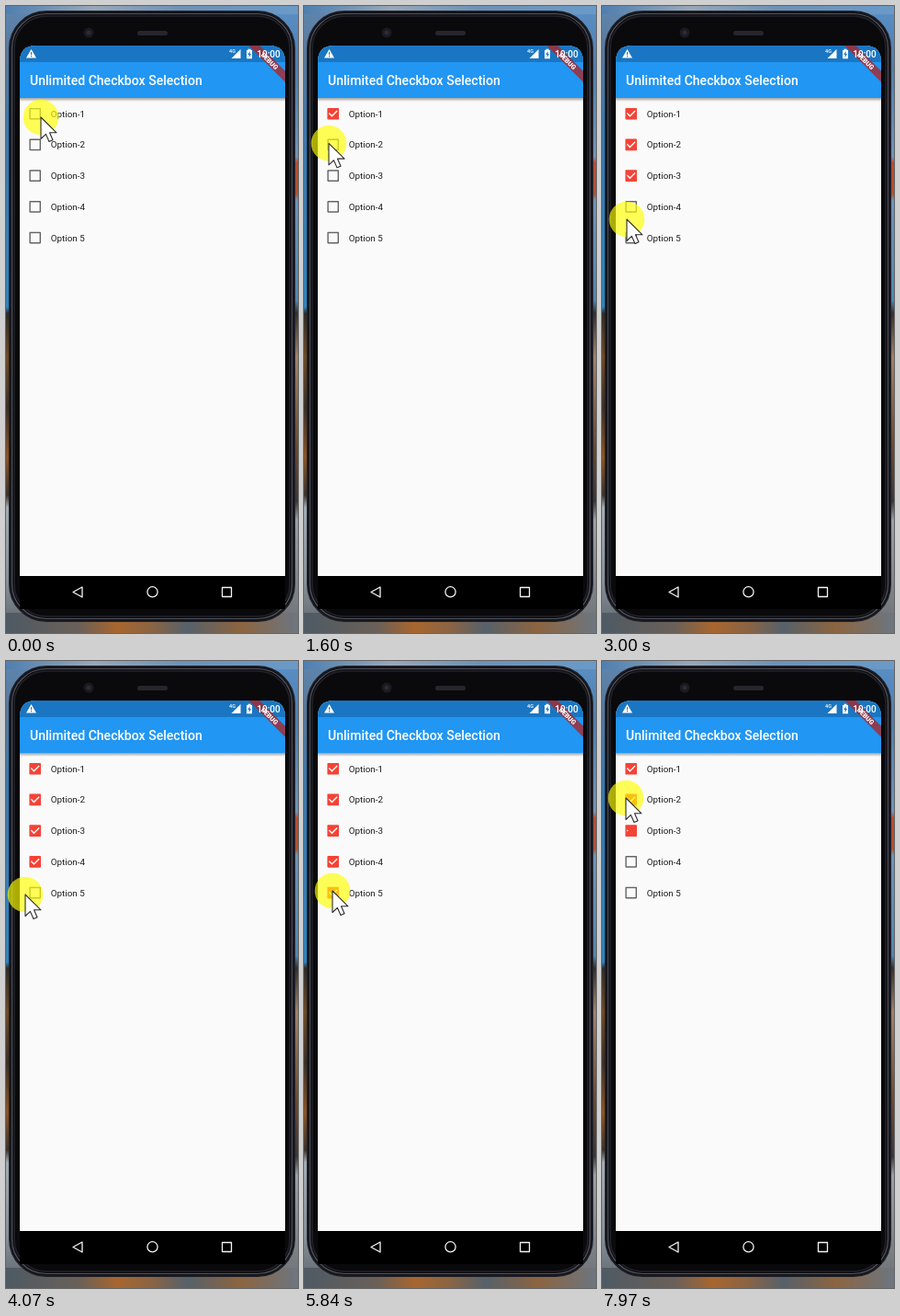
Animation of 318 by 682 pixels, one loop 8 s. Source, as an HTML page:

```html
<!DOCTYPE html>
<html lang="en">
<head>
<meta charset="utf-8">
<title>Checkbox selection</title>
<style>
html, body { margin: 0; width: 100%; height: 100%; overflow: hidden; background: #000; }
svg { display: block; width: 100%; height: 100%; }
text { font-family: Roboto, sans-serif; }
</style>
</head>
<body>
<svg id="stage" viewBox="0 0 318 682" preserveAspectRatio="none">
  <defs>
    <linearGradient id="left" x2="0" y2="1">
      <stop offset="0" stop-color="#5f86ae"/>
      <stop offset=".08" stop-color="#58779a"/>
      <stop offset=".2" stop-color="#3a78ac"/>
      <stop offset=".48" stop-color="#2f83bd"/>
      <stop offset=".49" stop-color="#2e2c28"/>
      <stop offset=".56" stop-color="#6e4a26"/>
      <stop offset=".64" stop-color="#3a3026"/>
      <stop offset=".72" stop-color="#8a5426"/>
      <stop offset=".78" stop-color="#3a332c"/>
      <stop offset=".8" stop-color="#a3abb2"/>
      <stop offset=".92" stop-color="#858f98"/>
      <stop offset="1" stop-color="#5d6268"/>
    </linearGradient>
    <linearGradient id="right" x2="0" y2="1">
      <stop offset="0" stop-color="#5c8fc4"/>
      <stop offset=".1" stop-color="#4a7fb2"/>
      <stop offset=".24" stop-color="#6c96bc"/>
      <stop offset=".25" stop-color="#c0492c"/>
      <stop offset=".3" stop-color="#b0522e"/>
      <stop offset=".31" stop-color="#6a95bd"/>
      <stop offset=".47" stop-color="#4c86b4"/>
      <stop offset=".49" stop-color="#34302a"/>
      <stop offset=".56" stop-color="#a08268"/>
      <stop offset=".7" stop-color="#6a4a30"/>
      <stop offset=".79" stop-color="#3c3834"/>
      <stop offset=".82" stop-color="#98a0a6"/>
      <stop offset="1" stop-color="#6c7074"/>
    </linearGradient>
    <linearGradient id="top">
      <stop offset="0" stop-color="#4f7fb0"/>
      <stop offset=".3" stop-color="#98a8b8"/>
      <stop offset=".6" stop-color="#6d92b6"/>
      <stop offset="1" stop-color="#6a9ac8"/>
    </linearGradient>
    <linearGradient id="ground">
      <stop offset="0" stop-color="#4e5a64"/>
      <stop offset=".25" stop-color="#6a6058"/>
      <stop offset=".38" stop-color="#a8662e"/>
      <stop offset=".5" stop-color="#8a6444"/>
      <stop offset=".62" stop-color="#56616a"/>
      <stop offset=".8" stop-color="#8c6440"/>
      <stop offset="1" stop-color="#6c7680"/>
    </linearGradient>
    <linearGradient id="shade" x2="0" y2="1">
      <stop offset="0" stop-opacity=".36"/>
      <stop offset="1" stop-opacity="0"/>
    </linearGradient>
    <clipPath id="screen"><path d="M15 620V61Q15 43 33 43H286Q304 43 304 61V620Z"/></clipPath>
  </defs>

  <rect width="159" height="682" fill="url(#left)"/>
  <rect x="159" width="159" height="682" fill="url(#right)"/>
  <rect width="318" height="9" fill="url(#top)"/>
  <rect y="660" width="318" height="22" fill="url(#ground)"/>

  <rect x="4" y="6" width="310" height="663" rx="40" fill="#0c0c10" stroke="#1c1c24" stroke-width="2"/>
  <rect x="6.5" y="8.5" width="305" height="658" rx="37.5" fill="none" stroke="#55555f" stroke-width="1.2"/>
  <rect x="9" y="11" width="300" height="653" rx="35" fill="#0a0a0d" stroke="#22222a" stroke-width="1.5"/>
  <rect x="15" y="620" width="289" height="36" fill="#000"/>
  <circle cx="90" cy="29" r="5.5" fill="#1a1a20"/>
  <circle cx="90" cy="29" r="2.5" fill="#2c2c34"/>
  <rect x="143" y="27" width="33" height="5" rx="2.5" fill="#26262c"/>

  <g clip-path="url(#screen)">
    <rect x="15" y="43" width="289" height="577" fill="#fafafa"/>
    <rect x="15" y="100" width="289" height="4" fill="url(#shade)"/>
    <rect x="15" y="43" width="289" height="57" fill="#2196f3"/>
    <rect x="15" y="43" width="289" height="18" fill="#1a76c2"/>
    <text x="26" y="85.7" font-size="14.06" font-weight="500" fill="#fff">Unlimited Checkbox Selection</text>
    <g transform="translate(304 43) rotate(45)">
      <rect x="-30" y="19.7" width="60" height="8.4" fill="#a8292c" opacity=".8"/>
      <text y="26.4" font-size="7.1" font-weight="900" fill="#fff" text-anchor="middle">DEBUG</text>
    </g>
    <g fill="#fff">
      <path fill-rule="evenodd" d="M27.5 47L33 56.5H22ZM27 50V53.2H28V50ZM27 54V55.2H28V54Z"/>
      <text x="243" y="51" font-size="5.5" font-weight="500">4G</text>
      <path d="M255.5 47V57H245.5Z"/>
      <path fill-rule="evenodd" d="M262 48H263.5V46.8H266.5V48H268V57.2H262ZM265.6 49L263.3 53H264.7V56L267 52H265.6Z"/>
      <text x="273.3" y="56" font-size="10" font-weight="500">10:00</text>
    </g>
    <g id="options"></g>
  </g>

  <g fill="none" stroke="#f4f4f4" stroke-width="1.3" stroke-linejoin="round">
    <path d="M83 632V643L73 637.5Z"/>
    <circle cx="159.5" cy="637.3" r="5.6"/>
    <rect x="235.5" y="632.5" width="10" height="10"/>
  </g>

  <g id="pointer">
    <circle r="19.3" fill="#ff0" opacity=".66"/>
    <path d="M0 0V23.5L5.4 18.4L9 26.5L13 24.8L9.5 16.8H17Z" fill="#fff" stroke="#2c2c2c" stroke-width="1.1" stroke-linejoin="round"/>
  </g>
</svg>
<script>
const LOOP = 8000, FADE = 200, SIZE = 12.6, LINE = 1.4;
const NS = 'http://www.w3.org/2000/svg';
const $ = id => document.getElementById(id);

// Label, time ticked, time cleared
const options = [
  ['Option-1', 1150, 1e5],
  ['Option-2', 1950, 1e5],
  ['Option-3', 2530, 7885],
  ['Option-4', 3120, 7300],
  ['Option 5', 4500, 6300]
];

// Time, x, y of the pointer tip; the app reacts a little after each press
const path = [
  [0, 38, 121], [400, 34, 119], [900, 32, 118], [1200, 30, 119], [1500, 27, 149],
  [1750, 27, 150], [2080, 27, 184], [2320, 27, 185], [2620, 27, 217], [2850, 27, 219],
  [3000, 27, 232], [3250, 25, 252], [4070, 21, 254], [4350, 25, 252], [5400, 31, 250],
  [6250, 31, 250], [6800, 26, 215], [7100, 26, 213], [7400, 26, 183], [7650, 26, 182],
  [7920, 26, 149], [8000, 26, 149]
];

const clamp = v => Math.max(0, Math.min(1, v));
const mix = (a, b, k) => a + (b - a) * k;
const ease = k => k * k * (3 - 2 * k);

function set(node, attrs) {
  for (const key in attrs) node.setAttribute(key, attrs[key]);
}

function add(parent, tag, attrs) {
  const node = document.createElementNS(NS, tag);
  set(node, attrs);
  return parent.appendChild(node);
}

const boxes = options.map(([label, on, off], i) => {
  const row = add($('options'), 'g', { transform: `translate(25.4 ${110.9 + i * 33.72})` });
  const outer = add(row, 'rect', { width: SIZE, height: SIZE, rx: 0.8 });
  const inner = add(row, 'rect', { fill: '#fafafa' });
  const tick = add(row, 'path', { fill: 'none', stroke: '#fff', 'stroke-width': LINE });
  add(row, 'text', { x: 23.4, y: 9.8, 'font-size': 9.84, fill: '#1c1c1c' }).textContent = label;
  return { outer, inner, tick, on, off };
});

function tickPath(k) {
  const p = (x, y) => `${x * SIZE} ${y * SIZE}`;
  if (k <= 0) return '';
  const first = clamp(k * 2), second = clamp(k * 2 - 1);
  let d = `M${p(0.15, 0.45)}L${p(mix(0.15, 0.4, first), mix(0.45, 0.7, first))}`;
  if (second > 0) d += `L${p(mix(0.4, 0.85, second), mix(0.7, 0.25, second))}`;
  return d;
}

function drawBox(box, time) {
  const v = clamp((time - box.on) / FADE) - clamp((time - box.off) / FADE);
  const tint = clamp(v * 4), fill = clamp(v * 2);
  const edge = mix(LINE, SIZE / 2, fill), hole = SIZE - 2 * edge;
  const rgb = [mix(100, 244, tint), mix(100, 67, tint), mix(100, 54, tint)].map(Math.round);
  set(box.outer, { fill: `rgb(${rgb})` });
  set(box.inner, { x: edge, y: edge, width: hole, height: hole });
  set(box.tick, { d: tickPath(v * 2 - 1) });
}

function draw(time) {
  boxes.forEach(box => drawBox(box, time));
  const i = path.findIndex(p => p[0] > time);
  const [t0, x0, y0] = path[i - 1], [t1, x1, y1] = path[i];
  const k = ease((time - t0) / (t1 - t0));
  set($('pointer'), { transform: `translate(${mix(x0, x1, k)} ${mix(y0, y1, k)})` });
}

const start = performance.now();
function frame() {
  draw((performance.now() - start) % LOOP);
  requestAnimationFrame(frame);
}
frame();
</script>
</body>
</html>
```
